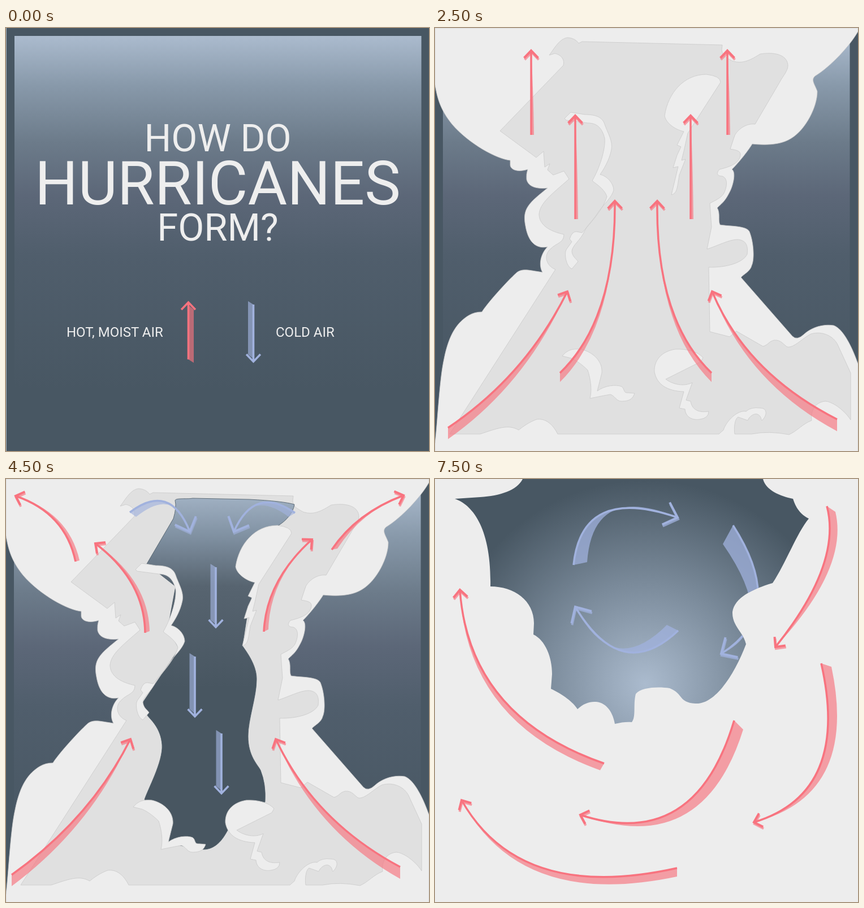
Animation of 748x748 px, one loop 8 s. Source, as an HTML page:

```html
<!DOCTYPE html>
<html lang="en">
<head>
<meta charset="utf-8">
<title>How do hurricanes form?</title>
<style>
  html, body { margin: 0; width: 100%; height: 100%; overflow: hidden; background: #485763; }
  svg { display: block; width: 100vw; height: 100vh; }
  text { font-family: Roboto, Arial, sans-serif; fill: #eee; }
  .title { text-anchor: middle; }
  .light, .grey { stroke: #c9c9c9; stroke-width: .8; vector-effect: non-scaling-stroke; }
  .light { fill: #ededed; }
  .grey { fill: #e0e0e0; }
  .scene { visibility: hidden; animation: full 8s step-end infinite; }
  .scene.half { animation-name: half; }
  @keyframes full { 0% { visibility: visible } 12.5%, 100% { visibility: hidden } }
  @keyframes half { 0% { visibility: visible } 6.25%, 100% { visibility: hidden } }
</style>
</head>
<body>
<svg id="stage" viewBox="0 0 748 748" xmlns="http://www.w3.org/2000/svg">
  <defs>
    <linearGradient id="sky" gradientUnits="userSpaceOnUse" x1="0" y1="14" x2="0" y2="640">
      <stop offset="0" stop-color="#abbbce"/><stop offset=".14" stop-color="#8899aa"/>
      <stop offset=".3" stop-color="#6c7b8a"/><stop offset=".45" stop-color="#5c6778"/>
      <stop offset=".62" stop-color="#505e6c"/><stop offset="1" stop-color="#485763"/>
    </linearGradient>
    <linearGradient id="shaft" gradientUnits="userSpaceOnUse" x1="0" y1="8" x2="0" y2="370">
      <stop offset="0" stop-color="#abbbce"/><stop offset=".25" stop-color="#8192a3"/>
      <stop offset=".5" stop-color="#576470"/><stop offset="1" stop-color="#485661"/>
    </linearGradient>
    <radialGradient id="eye" gradientUnits="userSpaceOnUse" cx="372" cy="362" r="360">
      <stop offset="0" stop-color="#abbbce"/><stop offset=".5" stop-color="#7a8a9a"/>
      <stop offset="1" stop-color="#485763"/>
    </radialGradient>
    <clipPath id="eyeClip"><use href="#eyeShape"/></clipPath>
    <path id="eyeShape" d="M35 35C65 45 100 85 98 190C140 190 175 215 175 255L174 275C195 285 207 315 207 345L205 371C225 380 245 395 252 407C265 395 275 394 285 394C305 396 315 415 318 433C330 430 340 429 348 430C356 420 350 400 355 380C365 368 395 367 415 370C440 380 430 395 460 397C495 400 530 345 550 292C545 270 525 260 526 235C530 210 560 195 597 184C620 150 640 95 661 70C640 60 635 40 633 35C610 30 585 20 580 0H155C145 20 115 30 80 32Z"/>
  </defs>
</svg>
<script>
const RED = '#f8737f', BLUE = '#a1b2de';

// Cloud outlines
const lowLeft = 'C90 490 125 450 145 432C155 425 165 428 190 432';
const base = 'L748 760H0V735C5 690 8 620 16 585C25 540 40 520 60 508Q70 502 83 502';
const tower = 'M0 0H748V6C735 30 700 68 672 85C664 92 672 100 676 112C676 140 655 180 630 195C610 208 580 207 561 205C555 215 540 235 525 250C533 255 527 280 520 292C512 308 505 312 499 318C505 328 500 340 504 348C520 351 550 349 556 360C564 380 565 410 560 420C558 430 545 436 541 441L632 545Q640 553 652 542C665 530 685 523 705 526C722 532 738 565 748 594'
  + base + lowLeft
  + 'C183 420 186 400 199 387C180 391 165 380 160 350C154 320 165 310 199 283C180 285 165 281 162 268Q161 258 164 250C145 256 133 250 133 242V234C110 232 60 205 30 170C10 145 4 125 0 100Z';
const wide = 'M0 0H748V10L690 72C712 110 725 150 725 170C726 200 715 215 700 225C680 245 665 257 648 257L632 309C655 325 668 355 668 385C668 415 655 440 652 449C665 465 680 470 689 492C710 498 735 507 742 520L748 522'
  + base + 'C50 430 10 300 0 235Z';

const core = (top, side) => 'M115 182L227 66C230 55 222 47 212 45L202 48C210 38 220 18 235 17Q248 18 254 27' + top
  + 'C508 50 515 52 525 58C545 65 560 55 575 46C600 42 622 47 624 65C625 75 615 85 610 95L566 170C550 168 535 180 530 190L522 214C535 216 541 218 540 225C538 240 520 246 503 250C496 258 500 262 508 262C516 265 518 275 512 290C508 300 495 305 486 310L489 352L481 391C500 385 520 374 535 374C550 375 554 385 552 400C545 415 515 424 484 423L486 537L521 546L533 536L580 563C590 560 590 554 600 552C612 551 616 560 623 564C635 566 650 548 665 541C685 535 705 545 712 560L735 610V693C722 673 700 660 690 660C670 662 664 680 666 694C650 700 640 713 626 719Q590 712 560 718H530C528 705 531 690 536 688L553 694C556 686 565 681 570 683C578 686 576 693 578 694C588 685 588 672 575 672Q558 670 550 678C535 675 515 695 510 711L502 718H217C208 700 195 690 180 692C168 696 155 705 148 711C130 700 110 708 80 718H26L213 427C195 420 192 400 205 390C215 380 228 380 228 365' + side + 'Z';
const towerCore = core('L260 24L508 30L507 38', 'C205 360 185 350 184 330C185 310 205 295 237 267L228 253L209 260L199 251L203 240L194 246L192 218L179 229');
const wideCore = core('L258 8L496 12L505 38', 'C180 350 145 290 129 230');

const curls = [
  'M229 160L240 149L265 153C285 153 296 158 300 170C305 185 315 200 312 215C308 235 298 250 292 259C305 262 316 275 316 287C312 300 300 310 289 325C280 340 272 345 265 358C258 375 242 385 242 395C243 405 250 408 253 413L242 426C232 422 228 400 232 392L242 378L238 373Q242 360 250 360L260 362C275 345 298 320 304 298C300 285 285 276 278 270C290 250 302 215 300 195C295 175 285 168 270 168L232 163Z',
  'M406 155C412 115 440 82 480 82Q505 85 505 96L447 186L440 218L436 234L443 232L432 260C428 285 428 292 418 295L430 245L421 247L428 225L435 210L428 207L440 183C425 180 408 168 406 155Z'
];
const lowCurls = [
  'M225 580C235 568 245 567 258 568C280 573 297 590 295 610L287 642C300 632 320 630 330 634C336 638 332 646 342 645L353 646C350 655 345 660 330 660C320 660 318 650 310 648Q298 650 274 655C278 640 275 620 270 605C260 595 250 588 241 584Z',
  'M474 583C465 572 445 567 425 568C400 572 387 588 388 608C392 630 410 642 440 643L432 672L442 674C443 688 455 694 468 692Q484 690 484 678C470 680 455 678 452 660L444 658L455 627C440 635 420 630 408 621L470 590Z'
];
const shaft = 'M299 38C300 33 320 36 330 34L430 36Q490 39 510 45C508 60 495 74 482 82L440 130L440 183L425 250L418 295C425 305 444 330 443 355C443 385 428 425 428 455C428 490 445 505 450 515Q460 540 458 571L410 590L388 628C378 645 365 655 349 655L290 645L270 580L245 567C250 550 278 500 276 470C274 440 255 425 250 418L242 395L306 300L286 265L300 190L249 150L296 70Q302 50 299 38Z';
const bowl = 'M240 52C245 35 290 15 320 16L350 18C375 10 410 5 440 10C470 15 490 30 510 38L575 46C550 62 510 72 478 81C500 90 507 100 505 115C500 140 480 140 474 147L472 165C485 168 490 170 488 180Q485 190 465 198C485 205 515 200 519 220C515 238 490 238 488 250C485 262 478 265 476 275C465 300 450 325 458 343C450 365 415 400 411 425C400 450 360 462 335 461C315 458 310 440 290 420C250 370 225 330 208 300L205 280L262 210L250 190L265 150L188 119C205 95 245 78 246 70Z';
const bowlCurl = 'M190 118C220 115 250 115 268 130C280 145 280 160 254 190Q280 197 281 210C270 225 240 250 214 266C200 275 202 285 214 295L208 300L172 283L180 276C200 262 250 230 267 212Q255 203 240 200L255 180Q264 170 264 162C258 140 235 118 205 126Z';

// Curved arrows: tail, control, tip, offset of the shaded side at the tail
const rise1 = [[22,714,175,640,233,551,0,15], [711,706,560,630,490,551,0,15],
  [221,647,325,580,318,410,0,13], [489,647,385,580,391,410,0,13]];
const rise2 = [[23,707,160,615,234,466,0,20], [711,692,550,610,490,466,0,21],
  [248,338,248,240,248,155,5,0], [452,338,452,240,452,155,5,0],
  [170,189,170,110,170,40,5,0], [517,189,517,110,517,40,5,0]];
const inner2 = [[221,610,320,515,318,306,0,16], [489,610,390,515,393,306,0,16]];
const rise3 = [[10,700,150,600,220,460,0,20], [697,686,545,605,477,460,0,21],
  [246,272,245,180,158,114,8,-3], [456,270,460,180,541,107,8,-4],
  [123,146,105,60,17,30,7,-2], [576,125,620,60,703,29,10,-2]];
const sink3 = [[219,59,290,5,325,93,11,8], [511,60,440,10,403,93,-11,7]];
const rise4 = [[62,390,10,270,76,127,13,-12], [122,295,100,160,193,41,14,-8],
  [193,560,250,450,179,295,-12,-12], [13,712,125,610,153,464,4,17],
  [508,668,385,665,298,545,0,9], [584,592,505,490,520,323,0,15],
  [603,425,632,270,560,144,17,12], [671,222,688,98,593,22,14,6]];
const sink4 = [[358,48,318,62,306,105,0,5], [402,329,400,390,360,414,-6,0]];
const spin = [[299,503,60,420,44,196,-7,12], [428,688,150,750,47,568,0,15],
  [529,427,460,660,257,594,16,16], [683,326,735,555,564,607,18,6], [693,48,720,150,602,297,15,10]];
const eyeSpin = [[245,152,260,10,429,68,24,-5], [430,268,330,363,248,226,-20,-10], [527,82,625,235,506,309,-18,33]];

const path = (cls, d) => `<path class="${cls}" d="${d}"/>`;
const group = (body, attrs) => `<g ${attrs}>${body}</g>`;
const mix = (a, b, k) => a.map((row, i) => row.map((v, j) => v + (b[i][j] - v) * k));

function chevron(x, y, angle, size) {
  const end = side => {
    const a = angle + Math.PI + side * .76;
    return `${(x + size * Math.cos(a)).toFixed(1)} ${(y + size * Math.sin(a)).toFixed(1)}`;
  };
  return `M${end(-1)}L${x} ${y}L${end(1)}`;
}

function arrow([x, y, cx, cy, tx, ty, dx, dy], color, size = 18, shade = .65) {
  const head = chevron(tx, ty, Math.atan2(ty - cy, tx - cx), size);
  const line = `M${x} ${y}Q${cx} ${cy} ${tx} ${ty}`;
  const band = `${line}Q${cx + dx * .8} ${cy + dy * .8} ${x + dx} ${y + dy}Z`;
  return `<path d="${band}" fill="${color}" opacity="${shade}"/>`
    + `<g fill="none" stroke="${color}"><path d="${head}" stroke-width="4" opacity="${shade}" transform="translate(1 3)"/>`
    + `<path d="${line}" stroke-width="3.5"/><path d="${head}" stroke-width="4"/></g>`;
}
const arrows = (list, color, size, shade) => list.map(a => arrow(a, color, size, shade)).join('');

// Vertical arrow with a flat band; dir is 1 for down, -1 for up
function bar(x, tail, tip, color, dir) {
  const w = -dir * 9.5;
  return `<path d="M${x} ${tail}L${x + w} ${tail - dir * 6}V${tip - dir * 13}L${x} ${tip - dir * 5}Z" fill="${color}" opacity=".65"/>`
    + `<path d="M${x} ${tail}V${tip}${chevron(x, tip, dir * Math.PI / 2, 18)}" fill="none" stroke="${color}" stroke-width="3.6"/>`;
}

const sky = (x = 14) => `<rect width="748" height="748" fill="#485763"/><rect x="${x}" y="14" width="719.5" height="734" fill="url(#sky)"/>`;

function title(x, rows, small, big, opacity) {
  const words = ['HOW DO', 'HURRICANES', 'FORM?'];
  return group(words.map((w, i) =>
    `<text class="title" x="${x}" y="${rows[i]}" font-size="${i === 1 ? big : small}">${w}</text>`).join(''), `opacity="${opacity}"`);
}
const legend = '<text x="107" y="546" font-size="24">HOT, MOIST AIR</text><text x="477" y="546" font-size="24">COLD AIR</text>'
  + bar(322.5, 586, 485, RED, -1) + bar(437.5, 489, 590, BLUE, 1);

const light = list => list.map(d => path('light', d)).join('');
const cloud = (s = 1, hole = '') => group(path('light', tower) + path('grey', towerCore) + hole + light(curls),
  `transform="translate(0 ${748 * (1 - s)}) scale(1 ${s})"`);
const open = cloud(1, `<path d="${shaft}" fill="url(#shaft)" stroke="#485763" stroke-width=".8"/>`) + light(lowCurls);
const falls = bar(371, 156, 262, BLUE, 1) + bar(334, 314, 420, BLUE, 1) + bar(381, 450, 556, BLUE, 1) + arrows(sink3, BLUE, 29);

const eye = (hole, swirl) => '<rect width="748" height="748" fill="#ededed"/>'
  + group('<use href="#eyeShape" fill="url(#eye)"/>' + group(arrows(eyeSpin, BLUE, 30, .75), 'clip-path="url(#eyeClip)"'), hole)
  + group(arrows(spin, RED), swirl);

const scenes = [
  [0, sky(15) + '<rect width="1" height="748" fill="#a9b2ba"/>' + title(374.5, [218, 312, 376], 67, 107, 1) + legend],
  [500, sky() + title(365, [209, 305, 371], 68, 108.5, .5) + group(legend, 'opacity=".5"') + cloud(.2)],
  [1500, sky() + cloud(.603) + light(lowCurls) + title(353.5, [204, 298, 367], 69.5, 110.5, .09) + arrows(rise1, RED, 18, .9)],
  [2500, sky() + cloud() + light(lowCurls) + arrows(rise2.concat(inner2), RED)],
  [3500, sky() + open + arrows(mix(rise2, rise3, .6), RED) + group(falls, 'transform="translate(0 -12)"')],
  [4500, sky() + open + arrows(rise3, RED) + falls],
  [5500, '<rect width="748" height="748" fill="#485763"/><rect x="14" width="719.5" height="748" fill="#546271"/>'
    + path('light', wide) + path('grey', wideCore) + `<path d="${bowl}" fill="url(#shaft)"/>` + light([bowlCurl, ...lowCurls])
    + arrows(rise4, RED) + arrows(sink4, BLUE) + bar(355.5, 184, 289, BLUE, 1)],
  [6500, eye('transform="translate(45 0) scale(.88)"', 'transform="rotate(-10 374 300)"')],
  [7500, eye('', '')]
];

document.getElementById('stage').insertAdjacentHTML('beforeend', scenes.map(([at, body]) =>
  group(body, `class="scene${at % 7500 ? '' : ' half'}" style="animation-delay:${at ? at - 8000 : 0}ms"`)).join(''));
</script>
</body>
</html>
```
